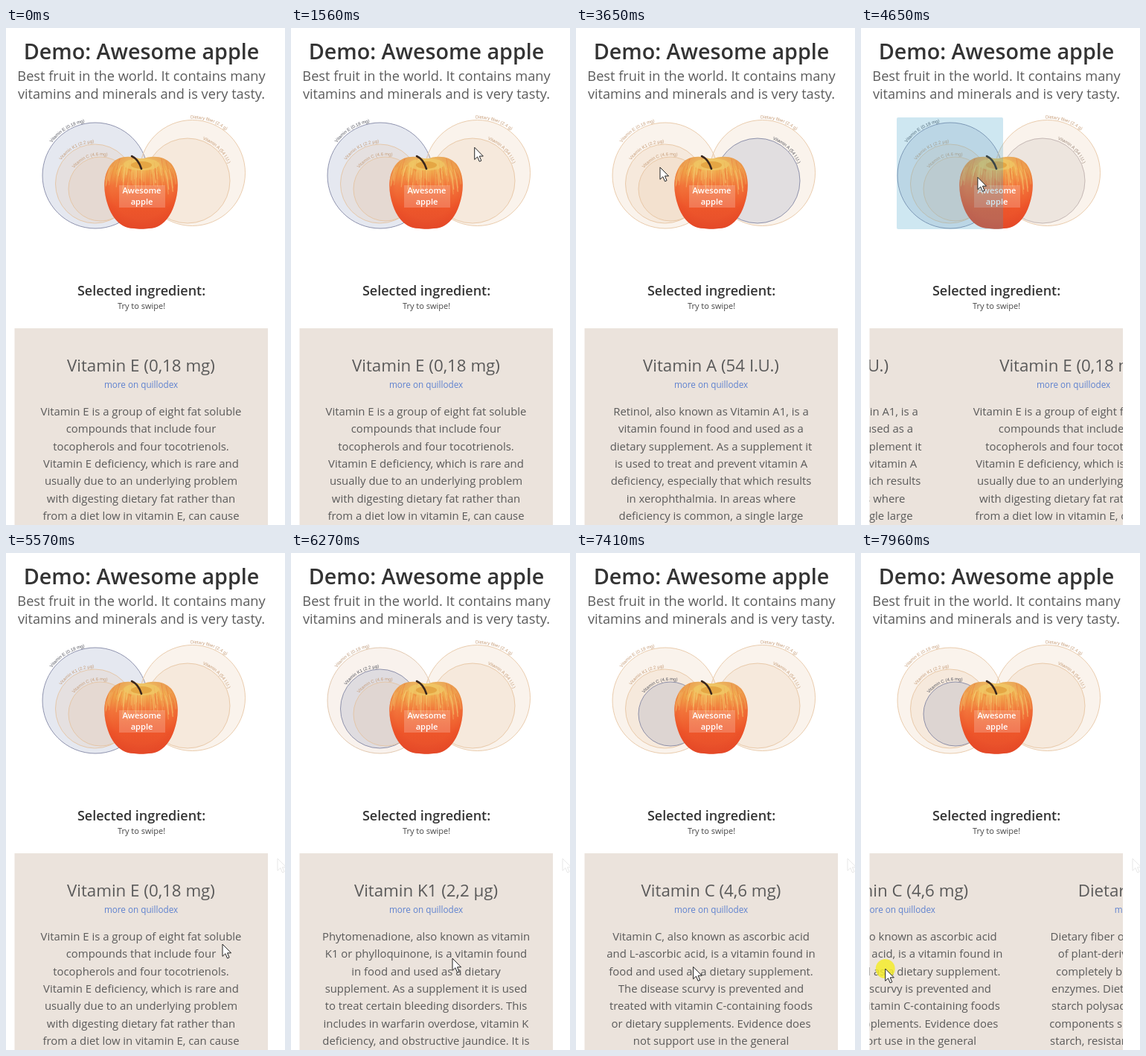
These frames come from a looping animation (375x667 px, 8000 ms). An HTML page:

```html
<!DOCTYPE html>
<html lang="en">
<head>
<meta charset="utf-8">
<title>Awesome apple</title>
<style>
  html, body { margin: 0; width: 100%; height: 100%; overflow: hidden; background: #fff; }
  svg { display: block; font-family: "Open Sans", "Noto Sans", sans-serif; }
  .center { text-anchor: middle; }
  .label { font: 6px "Liberation Sans", Arial, sans-serif; }
  .normal circle { fill: rgba(225, 185, 140, .17); stroke: #e5c09b; }
  .normal text { fill: #c59a74; }
  .selected circle { fill: rgba(60, 80, 140, .13); stroke: #777c9c; }
  .selected text { fill: #50525c; }
  circle { stroke-width: .8; }
</style>
</head>
<body>
<svg id="stage" width="375" height="667" viewBox="0 0 375 667">
  <defs>
    <clipPath id="cardClip"><rect x="11.5" y="403" width="340.5" height="264"/></clipPath>
    <path id="appleShape" d="M182 176C166 170 150 172 142 182C130 196 130 218 137 238C143 256 155 269 172 269C178 270 186 270 192 269C208 269 220 256 226 238C233 218 233 196 222 182C213 172 197 170 182 176Z"/>
    <clipPath id="appleClip"><use href="#appleShape"/></clipPath>
    <linearGradient id="appleSkin" x2="0" y2="1">
      <stop offset="0" stop-color="#ecc067"/>
      <stop offset=".18" stop-color="#f0ab4c"/>
      <stop offset=".4" stop-color="#f2743a"/>
      <stop offset=".7" stop-color="#ee562a"/>
      <stop offset="1" stop-color="#e64f2c"/>
    </linearGradient>
    <radialGradient id="appleShade" cx=".5" cy=".45" r=".58">
      <stop offset=".7" stop-color="#e0381c" stop-opacity="0"/>
      <stop offset="1" stop-color="#e0381c" stop-opacity=".35"/>
    </radialGradient>
    <path id="arrow" d="M0 0V16.3L3.9 12.7L6.5 18.9L9.1 17.8L6.5 11.8H11.6Z" fill="#fff" stroke="#222" stroke-width="1" stroke-linejoin="round"/>
  </defs>

  <g class="center">
    <text x="182" y="42" font-size="28.7" font-weight="600" fill="#333">Demo: Awesome apple</text>
    <g font-size="18.2" fill="#5c5c5c">
      <text x="182" y="71">Best fruit in the world. It contains many</text>
      <text x="182" y="95">vitamins and minerals and is very tasty.</text>
    </g>
    <text x="182" y="359" font-size="18" font-weight="600" fill="#333">Selected ingredient:</text>
    <text x="182" y="377" font-size="11" fill="#444">Try to swipe!</text>
  </g>

  <g id="circles"></g>

  <use href="#appleShape" fill="url(#appleSkin)"/>
  <g id="streaks" clip-path="url(#appleClip)" stroke-linecap="round"></g>
  <use href="#appleShape" fill="url(#appleShade)"/>
  <ellipse cx="182" cy="183" rx="24" ry="8" fill="#f0c765" opacity=".8"/>
  <ellipse cx="182" cy="184" rx="14" ry="5" fill="#e09a38" opacity=".7"/>
  <path d="M169 172Q178 176 182 189" fill="none" stroke="#38261d" stroke-width="2.6" stroke-linecap="round"/>
  <rect x="152" y="211" width="62" height="30" fill="#fff" opacity=".2"/>
  <g class="center" font-size="11.1" font-weight="600" fill="#fff">
    <text x="182.5" y="222">Awesome</text>
    <text x="182.5" y="237">apple</text>
  </g>

  <g fill="rgba(60,160,200,.25)">
    <rect id="tapA" x="187.5" y="144.5" width="114.5" height="117.5" rx="2"/>
    <rect id="tapE" x="48" y="120" width="143" height="150" rx="2"/>
  </g>

  <rect x="11.5" y="403" width="340.5" height="264" fill="#ebe3dc"/>
  <g clip-path="url(#cardClip)"><g id="slides" class="center"></g></g>

  <use id="ghost" href="#arrow" x="365" y="410" opacity=".1"/>
  <g id="cursor">
    <circle id="press" r="13" fill="#f5ec2c" opacity=".85"/>
    <use href="#arrow"/>
  </g>
</svg>
<script>
const LOOP = 8000, SLIDE_WIDTH = 340, FADE = 350;
const $ = id => document.getElementById(id);

function add(parent, tag, attrs = {}, text = '') {
  const node = document.createElementNS('http://www.w3.org/2000/svg', tag);
  for (const key in attrs) node.setAttribute(key, attrs[key]);
  node.textContent = text;
  return parent.appendChild(node);
}

// Circles are listed back to front; `angle` is where the label starts.
const circles = [
  { id: 'E', x: 120, y: 198, r: 71, angle: 217, label: 'Vitamin E (0.18 mg)' },
  { id: 'K', x: 119.5, y: 209, r: 53, angle: 215, label: 'Vitamin K1 (2.2 µg)' },
  { id: 'C', x: 127, y: 216, r: 43, angle: 218, label: 'Vitamin C (4.6 mg)' },
  { id: 'F', x: 250.5, y: 194.5, r: 71, angle: 268, label: 'Dietary fiber (2.4 g)' },
  { id: 'A', x: 244, y: 205, r: 57, angle: 290, label: 'Vitamin A (54 I.U.)' }
];

for (const c of circles) {
  const radius = c.r + 2;
  const point = degrees => {
    const a = degrees * Math.PI / 180;
    return `${c.x + radius * Math.cos(a)} ${c.y + radius * Math.sin(a)}`;
  };
  add($('circles'), 'path', {
    id: 'arc' + c.id, fill: 'none',
    d: `M${point(c.angle)}A${radius} ${radius} 0 0 1 ${point(c.angle + 100)}`
  });
  for (const state of ['normal', 'selected']) {
    const group = c[state] = add($('circles'), 'g', { class: state });
    add(group, 'circle', { cx: c.x, cy: c.y, r: c.r });
    const text = add(group, 'text', { class: 'label' });
    add(text, 'textPath', { href: '#arc' + c.id }, c.label);
  }
}

const slides = [
  ['Vitamin A (54 I.U.)',
    'Retinol, also known as Vitamin A1, is a', 'vitamin found in food and used as a',
    'dietary supplement. As a supplement it', 'is used to treat and prevent vitamin A',
    'deficiency, especially that which results', 'in xerophthalmia. In areas where',
    'deficiency is common, a single large'],
  ['Vitamin E (0,18 mg)',
    'Vitamin E is a group of eight fat soluble', 'compounds that include four',
    'tocopherols and four tocotrienols.', 'Vitamin E deficiency, which is rare and',
    'usually due to an underlying problem', 'with digesting dietary fat rather than',
    'from a diet low in vitamin E, can cause'],
  ['Vitamin K1 (2,2 µg)',
    'Phytomenadione, also known as vitamin', 'K1 or phylloquinone, is a vitamin found',
    'in food and used as a dietary', 'supplement. As a supplement it is used',
    'to treat certain bleeding disorders. This', 'includes in warfarin overdose, vitamin K',
    'deficiency, and obstructive jaundice. It is'],
  ['Vitamin C (4,6 mg)',
    'Vitamin C, also known as ascorbic acid', 'and L-ascorbic acid, is a vitamin found in',
    'food and used as a dietary supplement.', 'The disease scurvy is prevented and',
    'treated with vitamin C-containing foods', 'or dietary supplements. Evidence does',
    'not support use in the general'],
  ['Dietary fiber (2,4 g)',
    'Dietary fiber or roughage is the portion', 'of plant-derived food that cannot be',
    'completely broken down by digestive', 'enzymes. Dietary fiber consists of non-',
    'starch polysaccharides and other plant', 'components such as cellulose, resistant',
    'starch, resistant dextrins, inulin, lignins,']
];

slides.forEach(([title, ...lines], i) => {
  const x = 181.5 + i * SLIDE_WIDTH;
  add($('slides'), 'text', { x, y: 461, 'font-size': 22.3, fill: '#5a5a5a' }, title);
  add($('slides'), 'text', { x, y: 483, 'font-size': 11.7, fill: '#5f82cf' }, 'more on quillodex');
  lines.forEach((line, row) =>
    add($('slides'), 'text', { x, y: 520 + row * 23.35, 'font-size': 14.88, fill: '#5a5a5a' }, line));
});

// Fine yellow and orange streaks fan out over the apple's skin.
let seed = 7;
const random = () => (seed = seed * 16807 % 2147483647) / 2147483647;
for (let i = 0; i < 110; i++) {
  const side = random() * 2 - 1, top = 174 + random() * 18, length = 8 + random() * 24;
  const x = 182 + side * 44;
  add($('streaks'), 'path', {
    d: `M${x} ${top}q${side * 5} ${length / 2} ${side * 6} ${length}`,
    fill: 'none', stroke: i % 4 ? '#f4cd74' : '#ec7434',
    'stroke-width': 0.5 + random(), opacity: 0.25 + random() * 0.35
  });
}

// Slide position: time, index, and whether the step eases out.
const scroll = [
  [0, 1], [2500, 1], [2950, 0, true], [4450, 0], [4900, 1, true],
  [5680, 1], [5930, 1.45], [6230, 2, true], [6780, 2], [7010, 2.4],
  [7400, 3, true], [7700, 3], [7960, 3.385], [8000, 3.42]
];
const cursorPath = [
  [110, 134, 660], [450, 242, 430], [870, 222, 227], [1250, 246, 153], [1680, 247, 163],
  [2750, 247, 163], [3350, 124, 186], [3650, 113, 187], [4230, 93, 136], [4550, 93, 136],
  [4980, 365, 410], [5150, 350, 430], [5480, 291, 525], [5680, 291, 525], [5930, 138, 532],
  [6250, 217, 544], [6350, 217, 544], [6700, 280, 550], [6780, 280, 550], [7010, 144, 554],
  [7600, 164, 556], [7700, 164, 556], [7960, 33, 558], [8000, 21, 558]
];
const selections = [[-FADE, 'E'], [2500, 'A'], [4450, 'E'], [5950, 'K'], [7020, 'C']];
const presses = [[2430, 2580], [4380, 4530], [5680, 5930], [6780, 7010], [7700, 8000]];

const clamp = v => Math.max(0, Math.min(1, v));
const within = (t, from, to) => t >= from && t < to;

function segment(keys, t) {
  const next = Math.max(1, keys.findIndex(key => key[0] > t));
  const [a, b] = [keys[next - 1], keys[next]];
  return [a, b, clamp((t - a[0]) / (b[0] - a[0]))];
}

function scrollAt(t) {
  const [a, b, u] = segment(scroll, t);
  return a[1] + (b[1] - a[1]) * (b[2] ? 1 - (1 - u) ** 2 : u);
}

function cursorAt(t) {
  const [a, b, u] = segment(cursorPath, t);
  return [1, 2].map(k => a[k] + (b[k] - a[k]) * u);
}

function selectionOf(id, t) {
  const last = selections.findLastIndex(([start]) => start <= t);
  const u = clamp((t - selections[last][0]) / FADE);
  if (selections[last][1] === id) return 1 - (1 - u) ** 4;
  return last > 0 && selections[last - 1][1] === id ? 1 - u : 0;
}

function tapOpacity(t, start) {
  return t < start ? 0 : clamp((start + 420 - t) / 150);
}

function draw(t) {
  for (const c of circles) {
    const amount = selectionOf(c.id, t);
    c.normal.setAttribute('opacity', 1 - amount);
    c.selected.setAttribute('opacity', amount);
  }
  $('slides').setAttribute('transform', `translate(${-scrollAt(t) * SLIDE_WIDTH})`);
  $('tapA').setAttribute('opacity', tapOpacity(t, 2480));
  $('tapE').setAttribute('opacity', tapOpacity(t, 4430));
  $('cursor').setAttribute('transform', `translate(${cursorAt(t)})`);
  $('cursor').setAttribute('visibility', t < 110 || within(t, 7030, 7100) ? 'hidden' : 'visible');
  $('press').style.display = presses.some(([from, to]) => within(t, from, to)) ? '' : 'none';
  $('ghost').style.display = t >= 5050 ? '' : 'none';
}

const start = performance.now();
function tick() {
  draw((performance.now() - start) % LOOP);
  requestAnimationFrame(tick);
}
tick();
</script>
</body>
</html>
```
